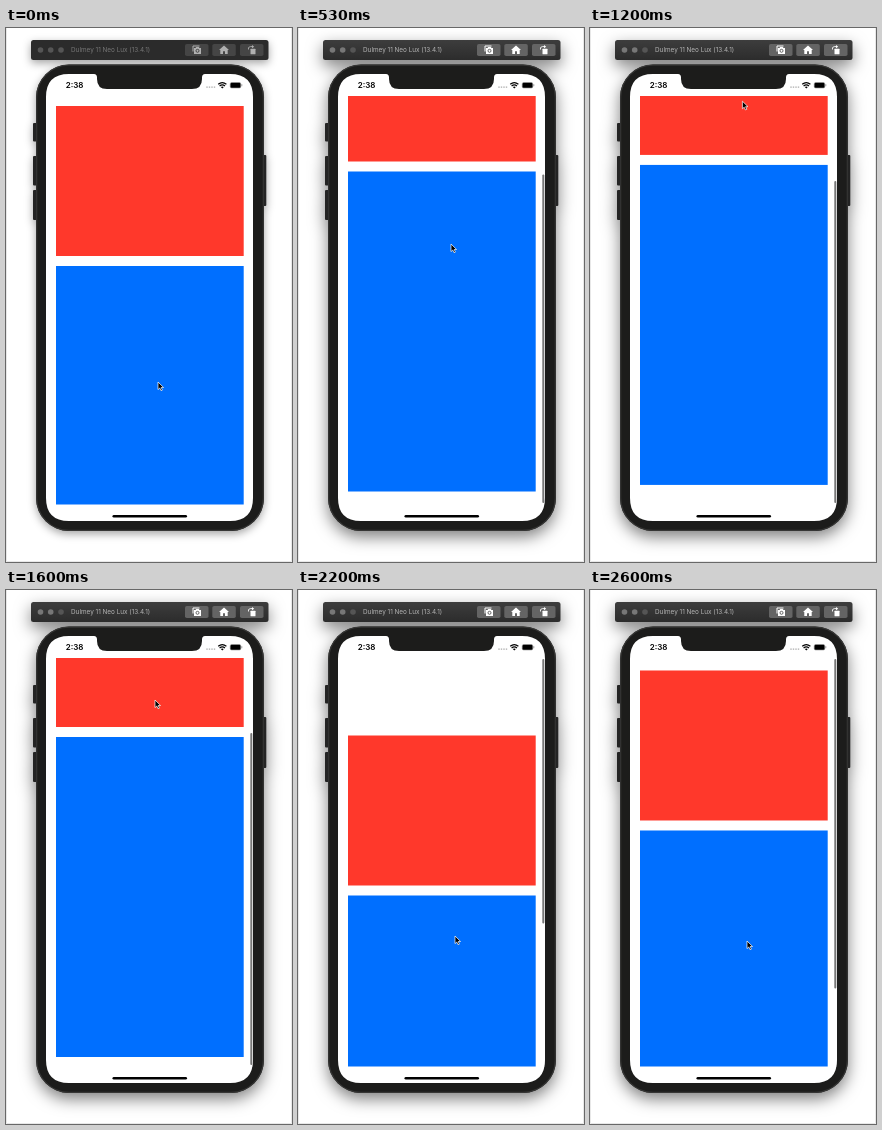
An HTML page that plays this animation: 286x534 px, repeating every 2670 ms.

```html
<!DOCTYPE html>
<html lang="en">
<head>
<meta charset="utf-8">
<title>Rubber-band scrolling</title>
<style>
  html, body { margin: 0; height: 100%; overflow: hidden; background: #fff; }
  svg { display: block; width: 286px; height: 534px; font-family: Inter, sans-serif; }
  #device { filter: drop-shadow(0 3px 4px rgba(0, 0, 0, .36)); }
  #bar { fill: #2b2b2b; }
  #lights { fill: #555; }
  #title { fill: #777; font-size: 6.4px; }
  .button { fill: #454545; }
  .icon { fill: #b0b0b0; }
  .line { fill: none; stroke: #b0b0b0; }
  .hole { fill: none; stroke: #454545; }
  .active #device { filter: drop-shadow(0 6px 8px rgba(0, 0, 0, .5)); }
  .active #bar { fill: url(#barShade); }
  .active #lights { fill: #777; }
  .active #title { fill: #b4b4b4; }
  .active .button { fill: #646464; }
  .active .icon { fill: #fff; }
  .active .line { stroke: #fff; }
  .active .hole { stroke: #646464; }
</style>
</head>
<body>
<svg id="stage" viewBox="0 0 286 534">
  <defs>
    <linearGradient id="barShade" x2="0" y2="1">
      <stop stop-color="#3d3d3d"/><stop offset="1" stop-color="#2c2c2c"/>
    </linearGradient>
    <clipPath id="safeArea"><rect x="40" y="68" width="207" height="408.5"/></clipPath>
  </defs>
  <path d="M.5 0V533.5H285.5V0" fill="none" stroke="#e8e8e8"/>

  <g id="device">
    <rect id="bar" x="25" y="12" width="237.5" height="20" rx="2.5"/>
    <g fill="#242424">
      <rect x="27" y="95" width="5" height="18.5" rx="1"/>
      <rect x="27" y="128" width="5" height="29.5" rx="1"/>
      <rect x="27" y="162" width="5" height="30" rx="1"/>
      <rect x="256" y="127" width="4.3" height="51" rx="1"/>
    </g>
    <rect x="30" y="36.5" width="228" height="466.5" rx="33" fill="#1c1c1b"/>
  </g>
  <rect x="30.7" y="37.2" width="226.6" height="465.1" rx="32.3" fill="none" stroke="#363635" stroke-width="1.2"/>

  <g id="lights">
    <circle cx="34.5" cy="22" r="2.8"/><circle cx="44.7" cy="22" r="2.8"/>
    <circle cx="55" cy="22" r="2.8" fill="#555"/>
  </g>
  <text id="title" x="65" y="24.4">Dulmey 11 Neo Lux (13.4.1)</text>
  <g class="button">
    <rect x="179" y="16" width="23.5" height="12" rx="1.8"/>
    <rect x="206.3" y="16" width="23.5" height="12" rx="1.8"/>
    <rect x="234" y="16" width="23.5" height="12" rx="1.8"/>
  </g>
  <path class="line" d="M187 23.5V18H193.5"/>
  <path class="icon" d="M188 20H189.5L190.2 19H192.8L193.5 20H195V26H188Z"/>
  <circle class="hole" cx="191.5" cy="22.8" r="1.5"/>
  <path class="icon" d="M218 17.6L223 22H221.7V26H219V23.2H217V26H214.3V22H213Z"/>
  <rect class="icon" x="244.5" y="20.8" width="5" height="5.4" rx=".5"/>
  <path class="line" d="M242.5 21.5C242 19 243.5 18.3 246.5 18.6" stroke-width=".9"/>
  <path class="icon" d="M246 17L248.2 18.7L246 20.2Z"/>

  <path fill="#fff" d="M63 46H88Q91 46 91 49.5V51Q91 61 101 61H186Q196 61 196 51V49.5Q196 46 199 46H224Q247 46 247 69V470Q247 493 224 493H63Q40 493 40 470V69Q40 46 63 46Z"/>
  <text x="59.7" y="60.3" font-size="8" font-weight="600">2:38</text>
  <path d="M200.3 59.2H210" stroke="#aaa" stroke-width="1.2" stroke-dasharray="1.4 1.1"/>
  <g fill="none" stroke="#000" stroke-width="1.2">
    <path d="M212.2 56.3Q216.3 52.9 220.4 56.3M213.6 58Q216.3 55.9 219 58"/>
  </g>
  <path d="M214.8 59.1Q216.3 58 217.8 59.1L216.3 60.6Z"/>
  <rect x="224.2" y="54.5" width="10.6" height="5.5" rx="1.5" fill="#000" stroke="#999" stroke-width=".6"/>
  <path d="M235.8 56.2V58.2" stroke="#888" stroke-width=".8"/>

  <g clip-path="url(#safeArea)">
    <g id="content">
      <rect x="50" y="78" width="187.7" height="150" fill="#ff382b"/>
      <rect x="50" y="238" width="187.7" height="320" fill="#006fff"/>
    </g>
  </g>
  <rect id="thumb" x="244.3" width="2" rx="1" fill="#777"/>
  <rect x="106.5" y="487" width="74.5" height="2.6" rx="1.3"/>
  <path id="cursor" d="M0 0V7.6L1.8 6L3 8.7L4.4 8.1L3.2 5.5H5.6Z" stroke="#fff" stroke-width=".7" stroke-linejoin="round"/>
</svg>
<script>
const LOOP = 2670, FPS = 15, MAX_SCROLL = 91;
const $ = id => document.getElementById(id);

// Rows are [step, ...values].
const dragUp = [[4, 0], [5, -8], [8, -94.5], [10, -118], [13, -144.5], [15, -152]];
const dragDown = [[24, -91], [25, -70], [27, 5], [29, 37], [31, 56], [33, 67.5]];
const pointer = [
  [4, 152, 354], [5, 152, 325], [8, 153, 216], [13, 153, 80], [15, 153, 69],
  [20, 152, 76], [24, 149, 110], [25, 150, 136], [27, 153, 214],
  [29, 156, 296], [31, 157, 329], [33, 157, 346], [39, 157, 351]
];

function sample(keys, step) {
  const next = keys.findIndex(key => key[0] > step);
  if (next === 0) return keys[0].slice(1);
  if (next < 0) return keys[keys.length - 1].slice(1);
  const a = keys[next - 1], b = keys[next];
  const mix = (step - a[0]) / (b[0] - a[0]);
  return a.slice(1).map((v, i) => v + (b[i + 1] - v) * mix);
}

function scrollOffset(step) {
  if (step < 15) return sample(dragUp, step)[0];
  if (step < 24) return -MAX_SCROLL - 61 * Math.exp(-.6 * (step - 15));
  if (step < 33) return sample(dragDown, step)[0];
  return 67.5 * Math.exp(-.55 * (step - 33));
}

function draw(now) {
  const step = Math.floor(now % LOOP * FPS / 1000 + .1);
  const offset = scrollOffset(step);
  const [x, y] = sample(pointer, step);
  const pulled = Math.max(0, offset);
  const past = Math.max(0, -offset - MAX_SCROLL);
  const progress = Math.min(1, Math.max(0, -offset / MAX_SCROLL));

  $("stage").classList.toggle("active", step >= 4);
  $("content").setAttribute("transform", `translate(0 ${offset})`);
  $("cursor").setAttribute("transform", `translate(${x} ${y})`);
  // The thumb shrinks against whichever end is overscrolled.
  $("thumb").setAttribute("y", 69 + 74 * progress + past);
  $("thumb").setAttribute("height", 332 - pulled - past);
  $("thumb").setAttribute("opacity", step >= 5 ? 1 : 0);
  requestAnimationFrame(draw);
}
requestAnimationFrame(draw);
</script>
</body>
</html>
```
